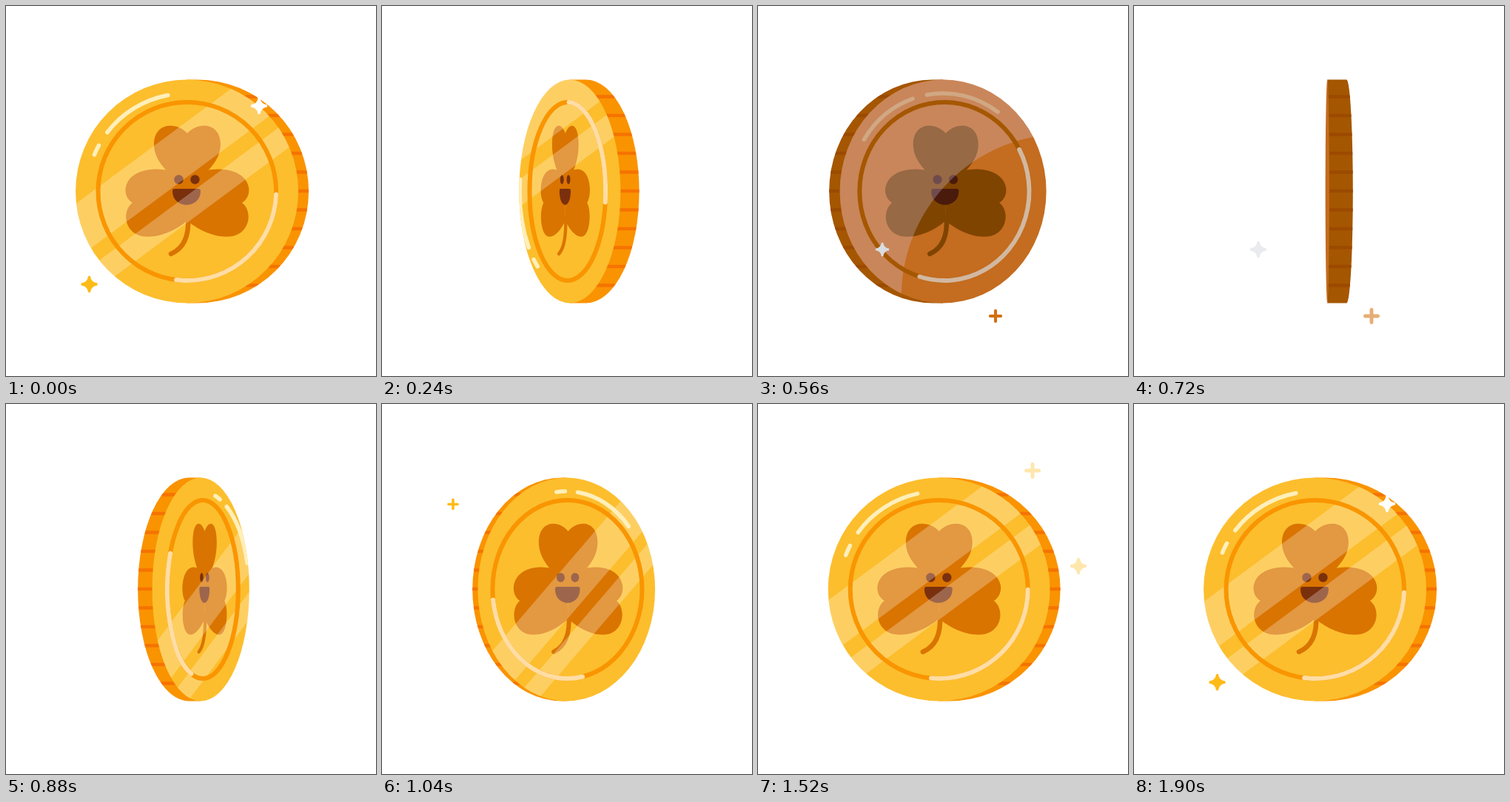
An HTML page with a canvas for the animation above (1980 ms loop, 500x500 px).

```html
<!DOCTYPE html>
<html lang="en">
<head>
<meta charset="utf-8">
<title>Lucky coin</title>
<style>
html, body { margin: 0; width: 100%; height: 100%; overflow: hidden; background: #fff; }
canvas { display: block; width: 100vw; height: 100vh; }
</style>
</head>
<body>
<canvas id="stage" width="500" height="500"></canvas>
<script>
const ctx = document.getElementById('stage').getContext('2d');
const LOOP = 1980, MID = 250.5, R = 151, TAU = Math.PI * 2;

// home: highlight spin at rest; pull: how far the face moves left when seen from the front
const GOLD = {
  edge: '#fa9300', tick: '#f57300', face: '#fcbe2d', ring: '#f99500', clover: '#d97400',
  eye: '#7a300d', gloss: '#ffefba', arc: '#ffdda5', shine: 'rgba(255,255,255,.26)',
  glossSpans: [[217, 259], [202, 208]], arcSpan: [2, 97], home: 0, pull: 17, addShine: stripes
};
const BRONZE = {
  edge: '#a55600', tick: '#9b4a00', face: '#c46c1f', ring: '#a55700', clover: '#7f4400',
  eye: '#4a1a0c', gloss: '#d0a883', arc: '#d2b8a0', shine: 'rgba(210,202,245,.28)',
  glossSpans: [[212, 251], [260, 306]], arcSpan: [-28, 107], home: 180, pull: 13.5, addShine: crescent
};

const POSES = [
  { at: 0, turn: -4.7, depth: 14, spin: 0, ease: 1.4 },
  { at: 240, turn: 63, depth: 22, spin: -72, ease: 1 },
  { at: 560, turn: 157.5, depth: 14, spin: -180, ease: 1 },
  { at: 720, turn: 269, depth: -26, spin: -250, ease: 1 },
  { at: 1040, turn: 322.5, depth: -6, spin: -299, ease: 1 },
  { at: 1280, turn: 349.5, depth: 14, spin: -364, ease: .5 },
  { at: 1900, turn: 355.3, depth: 14, spin: -360 }
];

const YELLOW = '#fdbb18';
const BURSTS = [
  { at: 480, life: 350, sparks: [[star, 168, 329, '#d9dce1'], [plus, 321, 419, '#d2700f']] },
  { at: 960, life: 480, sparks: [[plus, 96, 135.5, YELLOW], [star, 331, 375, '#fff']] },
  { at: 1200, life: 400, sparks: [[plus, 371, 90, YELLOW], [star, 433, 219, YELLOW]] },
  { at: 1690, life: 205, sparks: [[star, 436, 62, YELLOW]] },
  { at: 1800, life: 420, sparks: [[star, 342, 135, '#fff'], [star, 112.5, 376, YELLOW]] }
];

const TOP = new Path2D('M0 252C-15 232 -45 215 -45 187C-45 157 -14 156 0 172C14 156 45 157 45 187C45 215 15 232 0 252Z');
const LEAF = new Path2D('M0 236C-14 220 -45 218 -60 223C-86 230 -90 256 -74 266C-88 276 -86 305 -62 311C-38 315 -14 302 0 290Z');
const MOUTH = new Path2D('M-17 247H15Q18 247 18 250C18 275 -20 275 -20 250Q-20 247 -17 247Z');

function poseAt(t) {
  const i = Math.max(1, POSES.findIndex(p => p.at > t));
  const a = POSES[i - 1], b = POSES[i];
  const p = ((t - a.at) / (b.at - a.at)) ** a.ease;
  const mix = key => a[key] + (b[key] - a[key]) * p;
  return { turn: mix('turn') * TAU / 360, depth: mix('depth'), spin: mix('spin') };
}

// Everything about the visible face follows from the turn of the coin.
function coinAt(t) {
  const { turn, depth, spin } = poseAt(t);
  const cos = Math.cos(turn), c = Math.abs(cos);
  const look = cos >= 0 ? GOLD : BRONZE;
  const offset = depth * Math.sign(cos);
  const x = 261.5 - look.pull * c + Math.max(0, -offset) * (1 - c);
  const slip = .6 - .3 * offset * (1 - c ** 16);
  const squash = Math.max(.03, 1 - 1.675 * (1 - c) ** 1.69);
  return {
    look, c, x, squash,
    rx: R * c,
    backX: x + offset,
    backRx: R * c + 6 * (1 - c),
    cloverX: x + slip,
    ringX: x + slip / 2,
    ringRx: 120.5 * (c + squash) / 2,
    spin: (spin + look.home + 540) % 360 - 180
  };
}

function oval(x, rx, ry, from = 0, to = 360) {
  ctx.beginPath();
  ctx.ellipse(x, MID, rx, ry, 0, from * TAU / 360, to * TAU / 360);
}

function stroke(color, width) {
  ctx.strokeStyle = color;
  ctx.lineWidth = width;
  ctx.stroke();
}

function drawEdge({ x, rx, backX, backRx, look }) {
  const hull = new Path2D();
  hull.ellipse(backX, MID, backRx, R, 0, 0, TAU);
  hull.rect(Math.min(x, backX), MID - R, Math.abs(backX - x), R * 2);
  ctx.save();
  ctx.clip(hull);
  ctx.fillStyle = look.edge;
  ctx.fillRect(0, 0, 500, 500);
  const dir = Math.sign(backX - x);
  for (let i = -5; i <= 5; i++) {
    const y = 250 + i * 25.5;
    const reach = Math.sqrt(1 - ((y - MID) / R) ** 2);
    ctx.beginPath();
    ctx.moveTo(x + dir * rx * reach, y);
    ctx.lineTo(backX + dir * (backRx * reach - 1), y);
    stroke(look.tick, 4.5);
  }
  ctx.restore();
}

function drawClover({ cloverX, squash, look }) {
  ctx.save();
  ctx.translate(cloverX, 0);
  ctx.scale(squash, 1);
  ctx.fillStyle = look.clover;
  ctx.fill(TOP);
  ctx.fill(LEAF);
  ctx.scale(-1, 1);
  ctx.fill(LEAF);
  ctx.scale(-1, 1);
  ctx.fillStyle = look.eye;
  for (const eye of [-11.5, 10.5]) {
    ctx.beginPath();
    ctx.arc(eye, 234.5, 6.2, 0, TAU);
    ctx.fill();
  }
  ctx.fill(MOUTH);
  ctx.beginPath();
  ctx.moveTo(1, 285);
  ctx.bezierCurveTo(3, 312, -6, 328, -22, 335);
  ctx.restore();
  stroke(look.clover, 3 + 3.5 * squash);
}

// A wide and a thin slanted band that slide as the highlights spin.
function stripes({ x, spin }) {
  const rise = 200 * (.74 + .007 * Math.max(0, spin));
  ctx.beginPath();
  for (const [top, bottom] of [[156, 231], [256, 293]]) {
    ctx.moveTo(x - 200, top + spin + rise);
    ctx.lineTo(x + 200, top + spin - rise);
    ctx.lineTo(x + 200, bottom + spin - rise);
    ctx.lineTo(x - 200, bottom + spin + rise);
  }
}

function crescent({ x, c }) {
  ctx.beginPath();
  ctx.rect(0, 0, 500, 500);
  ctx.ellipse(x + 177 * c, 393, 238 * c, 220, 0, 0, TAU);
}

function drawCoin(coin) {
  const { look, x, rx, ringX, ringRx, spin } = coin;
  drawEdge(coin);
  oval(x, rx, R);
  ctx.fillStyle = look.face;
  ctx.fill();
  if (rx < 6) return;

  ctx.save();
  ctx.clip();
  drawClover(coin);
  look.addShine(coin);
  ctx.fillStyle = look.shine;
  ctx.fill('evenodd');
  oval(ringX, ringRx, 120.5);
  stroke(look.ring, 6);
  for (const [from, to] of look.glossSpans) {
    oval(x, rx * .82 + 11.5, 132.5, from + spin, to + spin);
    stroke(look.gloss, 5.5);
  }
  const [from, to] = look.arcSpan;
  oval(ringX, ringRx, 120.5, from + spin * 1.25, to + spin * 1.25);
  stroke(look.arc, 6);
  ctx.restore();
}

function star(r, color) {
  const w = r * .13, q = r * .22;
  ctx.beginPath();
  for (let i = 0; i < 4; i++) {
    ctx.lineTo(-w, -r);
    ctx.lineTo(w, -r);
    ctx.quadraticCurveTo(q, -q, r, -w);
    ctx.rotate(TAU / 4);
  }
  ctx.fillStyle = color;
  ctx.fill();
}

function plus(r, color) {
  const w = r * .45, arm = r - w / 2;
  ctx.beginPath();
  ctx.moveTo(-arm, 0);
  ctx.lineTo(arm, 0);
  ctx.moveTo(0, -arm);
  ctx.lineTo(0, arm);
  stroke(color, w);
}

function drawBurst({ at, life, sparks }, t) {
  const p = (t - at + LOOP) % LOOP / life;
  if (p >= 1) return;
  for (const [shape, x, y, color] of sparks) {
    ctx.save();
    ctx.translate(x, y);
    ctx.globalAlpha = Math.min(1, 1.8 * (1 - p));
    shape(11 * Math.min(1, .4 + 1.9 * p), color);
    ctx.restore();
  }
}

// The coin moves on held steps; the last step rests in the opening pose.
function step(ms) {
  const t = ms % LOOP;
  if (t >= 1900) return 0;
  return t >= 1700 ? Math.floor(t / 100) * 100 : Math.min(1600, Math.floor(t / 80) * 80);
}

function draw(ms) {
  const t = step(ms);
  ctx.fillStyle = '#fff';
  ctx.fillRect(0, 0, 500, 500);
  ctx.lineCap = ctx.lineJoin = 'round';
  drawCoin(coinAt(t));
  BURSTS.forEach(b => drawBurst(b, t));
}

const start = performance.now();
function tick() {
  draw(performance.now() - start);
  requestAnimationFrame(tick);
}
tick();
</script>
</body>
</html>
```
